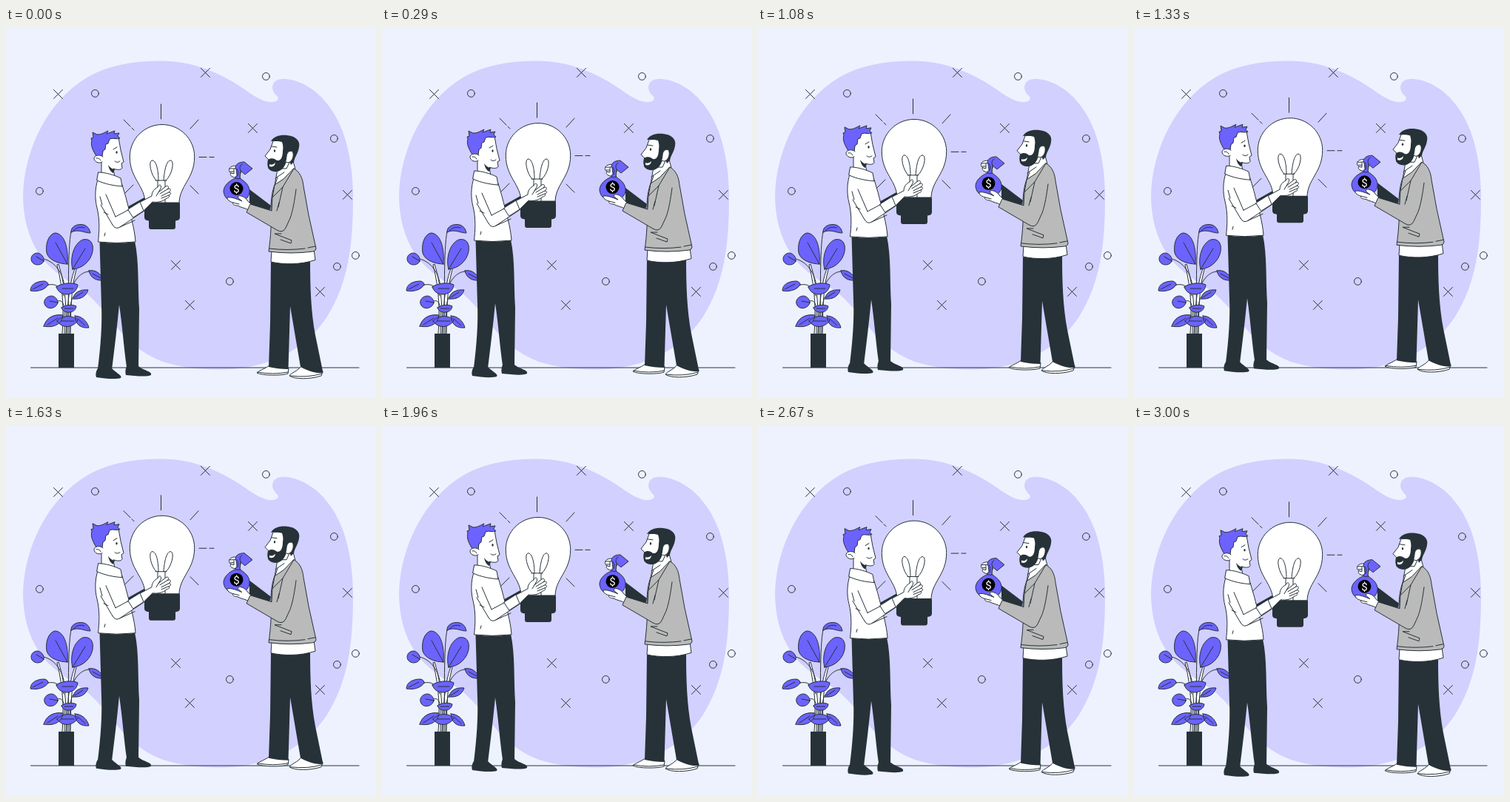
Recreate the animation shown at these times as an HTML page. Size 500 by 500 pixels, loop 3.04 s.

```html
<!DOCTYPE html>
<html lang="en">
<head>
<meta charset="utf-8">
<title>Idea and funding</title>
<style>
html, body { margin: 0; height: 100%; overflow: hidden; background: #eef2ff; }
svg { display: block; width: 100%; height: 100%; }
.line { fill: none; stroke: #263238; stroke-linecap: round; stroke-linejoin: round; }
.white, .purple, .grey { stroke: #263238; stroke-linejoin: round; stroke-linecap: round; }
.white { fill: #fff; }
.purple { fill: #6c63ff; }
.grey { fill: #bababa; }
.dark { fill: #263238; }
.bare { stroke: none; }
</style>
</head>
<body>
<svg viewBox="0 0 500 500">
  <path fill="#d2d0ff" d="M23 225C25 165 55 99 111 66C141 49 176 44.500 210 44.500C254 44.500 291 61 324 84C338 94 350 101 361 100C367 99 369 96 367 93C363 89 360 85 360 80C361 71 368 68 378 69C412 72 441 102 455 140C465 168 469 198 469 230C469 295 462 345 434 390C407 431 365 454 315 460C279 464 240 460 212 451C183 440 163 421 148 402C137 388 124 372 109 359C91 345 66 333 49 311C31 287 23 258 23 225Z"/>
  <g id="marks" class="line" transform="translate(.4 .4)"></g>
  <path class="line" d="M33.500 459H477"/>

  <g id="plant">
    <path class="white" d="M76 413C78 385 78 355 69 320L71 319C81 350 82 385 81 413ZM82 413C83 380 84 350 93 325L95 326C87 355 88 385 87 413Z"/>
    <path class="line" d="M84 413C85 360 83 300 88 275M51 312C66 316 77 330 79 350M57 347C68 345 75 350 78 362M113 329C101 329 91 341 87 358M70 369C75 367 78 371 79 380M91 363C87 368 86 380 86 413M79 380V413"/>
    <path class="purple" d="M83 319C74 319 58 315 55 304C53 293 57 279 66 277C77 277 85 293 83 319ZM90 326C86 312 91 291 104 286C113 284 119 290 117 302C115 314 104 325 90 326ZM88 276C87 268 97 264 105 266C111 268 113 272 114 277C105 277 98 271 88 276ZM51 315C49 321 39 322 35 316C32 310 36 304 43 304C48 305 52 310 51 315ZM57 347C53 354 42 357 33 355C33 346 42 342 52 342C55 343 57 344 57 347ZM112 328C121 326 128 332 133 341C122 342 114 338 112 328ZM68 350C73 345 90 343 97 347C96 356 89 360 81 360C74 359 70 356 68 350ZM70 371C69 378 58 382 53 375C49 368 55 362 62 362C67 363 70 367 70 371ZM91 366C91 358 99 353 111 354C108 363 101 367 91 366ZM75 378C80 374 90 373 95 376C94 382 89 385 82 384C78 383 76 381 75 378ZM51 403C54 392 64 386 77 388C76 399 66 406 51 403ZM93 389C102 389 110 396 112 405C101 406 94 401 93 389ZM69 396C76 388 90 387 97 395C92 404 77 408 69 396Z"/>
    <path class="line" d="M83 319L67 290M90 326L107 298M91 274Q98 267 106 270M51 315L41 309M36 353L50 346M117 332L128 338M76 352H91M70 371L59 369M93 364L104 357M79 379H91M56 401L70 392M97 393L107 402M75 396H92"/>
    <path class="dark" d="M71 413H92V459H71Z"/>
  </g>

  <g id="people">
    <g id="inventor">
      <path class="dark" d="M162 243L187 229L191 234L166 250Z"/>
      <path class="line" d="M209.500 103V123M159 124L168 133M170 135L173 138M260 124L249 136M261 174.500H271M275 174.500H281M249 213L260 224M172 212L160 224"/>
      <path class="white" d="M188 237C188 213 167.300 204 167.300 174C167.300 150 187 130.500 211 130.500C235 130.500 254.700 150 254.700 174C254.700 204 234 213 234 237Z"/>
      <path class="line" d="M205 237V206M215 237V206M202 206H217M203 206C196 199 192 181 197 179C203 178 206 192 206 206M216 206C224 199 228 181 223 179C217 178 214 192 213 206"/>
      <path class="dark" d="M188 235.500H234Q235 236 235 238V256Q235 260 229 260.500V269Q229 272 226 272H196Q193 272 193 269V260.500Q187 260 187 256V238Z"/>
      <path class="dark" d="M126.500 288H174C180 315 178 350 180 380L179 459L163 458C159 430 157 400 153 374C150 405 147 430 143 462L124 461C128 430 130 400 129 376Z"/>
      <path class="dark" d="M124 460C121 465 121 469 122 472C134 474 149 475 155 473C158 470 150 467 143 460ZM163 457C161 462 161 466 162 469C174 470 190 472 196 469C198 464 186 463 179 457Z"/>
      <path class="white" d="M129 174L129 199C135 204 142 205 147 202L145 190C150 192 156 192 157 189L156 183L159 181L155 165L152 148L136 148Z"/>
      <path class="dark" d="M138 185C141 189 144 191 147 191L145 196C141 194 139 190 138 185Z"/>
      <path class="purple" d="M122 173C117 165 114 158 116 152L115 149L118 148L117 141L123 144C130 144 133 141 138 139L136 143L147 139L146 143L153 142L151 146L154 149C149 151 145 148 140 150L138 156L135 157L134 164L131 166L130 174Z"/>
      <path class="white" d="M131 174C128 171 120 171 119 176C119 181 126 184 130 181"/>
      <path class="line" d="M122 176Q126 175 128 179M145 164L150 161M147 180Q150 183 154 180"/>
      <ellipse class="dark" cx="149.500" cy="168" rx="1.200" ry="1.800"/>
      <path class="white" d="M124 205C120 217 120 232 123 243C127 259 126 276 124.500 289Q149 292 175 289C174 271 167 249 162 229L157 212Z"/>
      <path class="white" d="M125 195C135 195 147 199 155 203L157 214C145 213 134 211 123 206Z"/>
      <path class="white" d="M180 236L197 227C197 221 201 217 205 215C207 210 211 212 209 217L206 222L216 214C219 212 221 215 218 218L220 217C223 217 223 220 220 222C224 222 223 225 220 226C222 228 219 230 217 230C212 235 204 236 198 235L186 247Z"/>
      <path class="line" d="M218 218L208 224M220 222L210 227M220 226L210 230M206 222L203 227"/>
      <path class="white bare" d="M132 227L148 256L181 235L187 246L154 269Q148 274 143 267L128 240Z"/>
      <path class="line" d="M135 225L148 255M144 266L128 239M174 260L154 269Q148 273 144 266M148 255L165 246M132 249L138 252M134 277L133 281M127 228L130 239M165 246L181 235M154 269L187 247"/>
      <path class="white" d="M165 245L181 235L186 247L172 256Z"/>
    </g>

    <g id="investor">
      <path class="white" d="M357 455C352 460 343 462 339 466C346 470 373 470 381 467L382 460ZM399 457C394 464 385 466 383 470C390 475 411 475 426 470L428 464Z"/>
      <path class="line" d="M340 465Q361 469 381 465M384 470Q408 473 427 467"/>
      <path class="dark" d="M358 314H411C411 350 412 383 418 415L428.500 466C417 467 408 463 398 458L384 376L381.500 461C372 461 364 460 355 458L357 400Z"/>
      <path class="white" d="M359 301L358 316C375 320 398 320 418 313.500L416 299Z"/>
      <path class="white" d="M367 190L363 213L375 205L391 191L387 176Z"/>
      <path class="white" d="M361 153L357 164L350 173L355 178L355 190L379 190L386 175L380 152Z"/>
      <path class="dark" d="M358 153C362 146 371 144 380 145C392 146 398 153 396 161C395 169 390 174 389 181L385 185C382 176 379 178 378 183C375 191 369 195 362 194C354 193 352 186 354 178C358 175 363 176 366 179C371 180 374 175 374 166C375 161 374 157 373 154Q365 152 358 153Z"/>
      <path class="white" d="M379 174C379 166 387 164 388 169C389 175 386 181 381 182L378 181Z"/>
      <path fill="#fff" d="M356 184Q360 186 364 182Q363 189 356 187Z"/>
      <path class="line" d="M359 160L366 161M364 203L376 195M363 213L367 202"/>
      <ellipse class="dark" cx="363" cy="166" rx="1.200" ry="1.800"/>

      <path class="dark" d="M329 218L358 240L355 252L329 238Z"/>
      <path class="white" d="M314 187C309 185 303 187 302 190C300 194 304 197 309 198L317 196Z"/>
      <path class="line" d="M302 190L312 190M303 194L312 194"/>
      <path class="purple" d="M310 203C300 207 294 214 294 221C295 231 303 235 312 235C323 235 330 228 329 219C328 211 322 207 316 203L317 193L323 198L333 190L322 181C315 181 310 184 310 189Z"/>
      <path class="line" d="M310 203Q314 205 317 203M312 190Q315 194 313 200M317 193Q314 187 319 184"/>
      <path class="white" d="M309 202C304 201 302 198 304 196L308 197V191Q309 188 311 191L312 199Z"/>
      <circle cx="311.500" cy="217" r="9"/>
      <text x="311.500" y="222.300" fill="#fff" font-family="Roboto, sans-serif" font-size="15" text-anchor="middle">$</text>
      <path class="white" d="M332 239L326 233C323 228 317 226 314 227C312 230 317 232 319 234C312 231 304 228 299 229C298 232 303 235 307 236C305 238 309 240 313 240C318 243 323 243 328 246Z"/>
      <path class="line" d="M307 236L315 238"/>

      <path class="grey" d="M389 190C397 194 401 203 402 214L409 253L419 298Q419 301 415 302Q385 306 355 302C358 281 359 260 358 244C358 231 360 220 363 212L375 204Z"/>
      <path class="grey bare" d="M369 225L359 247L330 238L325 249L366 273Q374 278 378 271L389 246L393 213Z"/>
      <path class="line" d="M392 218C390 232 388 246 384 257L378 270Q374 278 366 273L325 249L330 238L359 247M363 212L360 229L374 215L389 190M360 229L359 246M374 215L368 242M372 278L363 278L386 287L385 291L371 286M356 298Q380 301 404 298M408 297L418 295M369 236L366 247"/>
    </g>
  </g>
</svg>
<script>
const PERIOD = 3040, RISE = 10;
const crosses = [[70, 89], [269, 60], [333, 135], [461, 225], [229, 320], [248, 374], [424, 356]];
const rings = [[120, 88], [351, 65], [443, 149], [45, 220], [302, 342], [447, 322], [472, 307]];
const people = document.getElementById("people");

document.getElementById("marks").innerHTML =
  crosses.map(([x, y]) => `<path d="M${x - 6} ${y - 6}l12 12m0-12l-12 12"/>`).join("") +
  rings.map(([x, y]) => `<circle cx="${x}" cy="${y}" r="4.900"/>`).join("");

// Linear float up and back down.
const start = performance.now();
function draw(now) {
  const phase = Math.max(0, now - start) % PERIOD / PERIOD;
  const lift = RISE * (1 - Math.abs(1 - 2 * phase));
  people.setAttribute("transform", `translate(0 ${-lift})`);
  requestAnimationFrame(draw);
}
draw(start);
</script>
</body>
</html>
```
